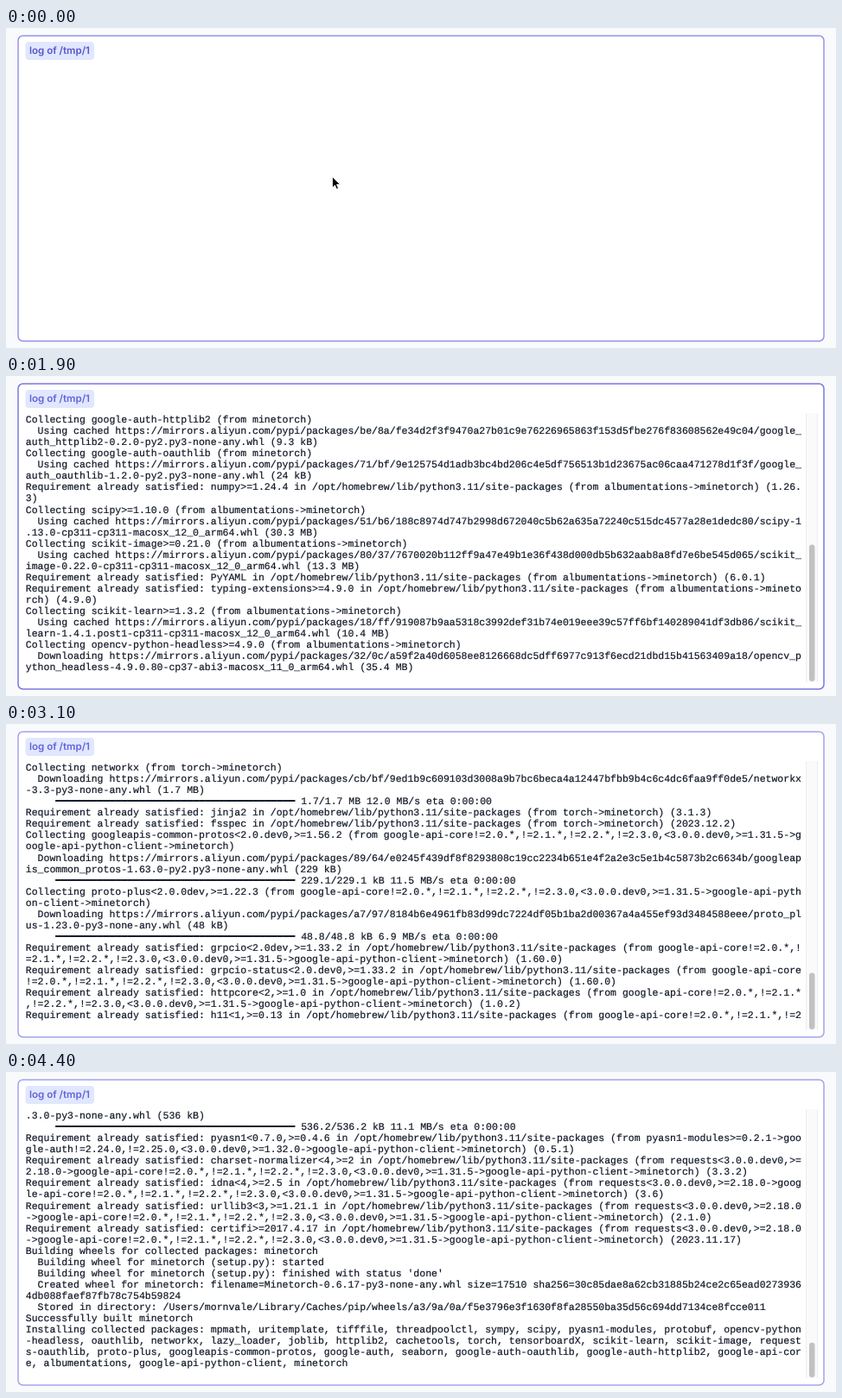
Animation, 960 px wide and 371 px high, one loop 4500 ms. Source, as an HTML page:

```html
<!DOCTYPE html>
<html lang="en">
<head>
<meta charset="utf-8">
<title>Install log</title>
<style>
  html, body { margin: 0; width: 100%; height: 100%; overflow: hidden; background: #f9fafc; }
  svg, pre { position: absolute; left: 0; top: 0; }
  pre {
    left: 22.8px; top: 45px; margin: 0; color: #111827; -webkit-text-stroke: .2px;
    font: 11.5px/13.06px "Liberation Mono", "DejaVu Sans Mono", monospace;
    text-rendering: geometricPrecision; font-variant-ligatures: none;
  }
  #badge { font: 600 11.55px Inter, sans-serif; text-rendering: geometricPrecision; }
</style>
</head>
<body>
<svg width="960" height="371">
  <rect id="card" x="14" y="9" width="932" height="354" rx="5.5" fill="#fff" stroke-width="1.5"/>
  <rect x="22.5" y="16" width="79.5" height="21" rx="4" fill="#e0e7ff"/>
  <text id="badge" x="27" y="30.3">log of /tmp/1</text>
  <g id="bar">
    <rect x="925.5" y="43" width="13" height="312" fill="#fafafa"/>
    <path d="M925.5 43v312M938.5 43v312" stroke="#ededed"/>
    <rect id="thumb" x="929" width="6.5" rx="3.2" fill="#c1c1c1"/>
  </g>
  <path id="cursor" d="M377.5 172.5v12.6l2.9-2.8 1.9 4.4 2.1-.9-1.9-4.3h4z" stroke="#fff" stroke-width=".8"/>
</svg>
<pre id="log"></pre>
<script>
const $ = id => document.getElementById(id);
const COLS = 130, ROWS = 23, LINE = 13.06, VIEW = 312, LOOP = 4500;
const CLIENT = 'google-api-python-client';
const CORE = 'google-api-core!=2.0.*,!=2.1.*,!=2.2.*,!=2.3.0,<3.0.0.dev0,>=1.31.5->' + CLIENT;
const AUTH = 'google-auth!=2.24.0,!=2.25.0,<3.0.0.dev0,>=1.32.0->' + CLIENT;
const REQUESTS = 'requests<3.0.0.dev0,>=2.18.0->' + CORE;
const ALB = 'albumentations', MPL = 'matplotlib', WHEEL = '-py3-none-any.whl';

const rows = [];   // wrapped terminal rows
const ends = [];   // row count after each burst of output

function say(...lines) {
  for (const line of lines)
    for (let i = 0; i < line.length; i += COLS) rows.push(line.slice(i, i + COLS));
}
const burst = () => ends.push(rows.length);
const from = by => `(from ${by ? by + '->' : ''}minetorch)`;

let seed = 7;
const hex = n => Array.from({ length: n }, () => {
  seed = seed * 16807 % 2147483647;
  return ((seed >> 8) % 16).toString(16);
}).join('');
const randomPath = () => [hex(2), hex(2), hex(60)].join('/');

function has(pkg, by, version) {
  say(`Requirement already satisfied: ${pkg} in /opt/homebrew/lib/python3.11/site-packages ${from(by)} (${version})`);
}
function get(pkg, by, file, size, path = randomPath(), verb = 'Downloading') {
  say(`Collecting ${pkg} ${from(by)}`,
      `  ${verb} https://mirrors.aliyun.com/pypi/packages/${path}/${file} (${size})`);
}
const cached = (pkg, by, file, size, path) => get(pkg, by, file, size, path, 'Using cached');
function progress(size, rate, unit = 'kB') {
  say(`     ${'━'.repeat(40)} ${size}/${size} ${unit} ${rate} MB/s eta 0:00:00`);
}

say('Looking in indexes: https://mirrors.aliyun.com/pypi/simple', 'Collecting minetorch',
    `  Using cached https://mirrors.aliyun.com/pypi/packages/${randomPath()}/minetorch-0.6.17.tar.gz (16 kB)`,
    '  Preparing metadata (setup.py): started',
    "  Preparing metadata (setup.py): finished with status 'done'");
cached(ALB, '', 'albumentations-1.4.3' + WHEEL, '137 kB');
cached('torch', '', 'torch-2.2.2-cp311-none-macosx_11_0_arm64.whl', '59.7 MB');
has(MPL, '', '3.8.4');
cached('tensorboardX', '', 'tensorboardX-2.6.2.2-py2.py3-none-any.whl', '101 kB');
cached('seaborn', '', 'seaborn-0.13.2' + WHEEL, '294 kB');
cached(CLIENT, '', 'google_api_python_client-2.125.0-py2.py3-none-any.whl', '12.4 MB');
has('tqdm', '', '4.66.2');
cached('google-auth-httplib2', '', 'google_auth_httplib2-0.2.0-py2.py3-none-any.whl', '9.3 kB',
  'be/8a/fe34d2f3f9470a27b01c9e76226965863f153d5fbe276f83608562e49c04');
cached('google-auth-oauthlib', '', 'google_auth_oauthlib-1.2.0-py2.py3-none-any.whl', '24 kB',
  '71/bf/9e125754d1adb3bc4bd206c4e5df756513b1d23675ac06caa471278d1f3f');
has('numpy>=1.24.4', ALB, '1.26.3');
cached('scipy>=1.10.0', ALB, 'scipy-1.13.0-cp311-cp311-macosx_12_0_arm64.whl', '30.3 MB',
  '51/b6/188c8974d747b2998d672040c5b62a635a72240c515dc4577a28e1dedc80');
cached('scikit-image>=0.21.0', ALB, 'scikit_image-0.22.0-cp311-cp311-macosx_12_0_arm64.whl', '13.3 MB',
  '80/37/7670020b112ff9a47e49b1e36f438d000db5b632aab8a8fd7e6be545d065');
has('PyYAML', ALB, '6.0.1');
has('typing-extensions>=4.9.0', ALB, '4.9.0');
cached('scikit-learn>=1.3.2', ALB, 'scikit_learn-1.4.1.post1-cp311-cp311-macosx_12_0_arm64.whl', '10.4 MB',
  '18/ff/919087b9aa5318c3992def31b74e019eee39c57ff6bf140289041df3db86');
get('opencv-python-headless>=4.9.0', ALB, 'opencv_python_headless-4.9.0.80-cp37-abi3-macosx_11_0_arm64.whl', '35.4 MB',
  '32/0c/a59f2a40d6058ee8126668dc5dff6977c913f6ecd21dbd15b41563409a18');
burst();

progress('35.4', '11.2', 'MB');
get('httplib2<1.dev0,>=0.15.0', CLIENT, 'httplib2-0.22.0' + WHEEL, '96 kB');
progress('96.9', '8.7');
get('google-auth!=2.24.0,!=2.25.0,<3.0.0.dev0,>=1.32.0', CLIENT, 'google_auth-2.29.0-py2.py3-none-any.whl', '189 kB');
progress('189.2', '12.1');
get(CORE.split('->')[0], CLIENT, 'google_api_core-2.18.0' + WHEEL, '138 kB');
progress('138.3', '10.4');
get('uritemplate<5,>=3.0.1', CLIENT, 'uritemplate-4.1.1-py2.py3-none-any.whl', '10 kB');
has('setuptools', 'tensorboardX', '69.0.3');
has('pyparsing<4,>=2.4.2', 'httplib2<1.dev0,>=0.15.0->' + CLIENT, '3.1.2');
has('wheel', 'torch', '0.42.0');
get('requests-oauthlib>=0.7.0', 'google-auth-oauthlib', 'requests_oauthlib-2.0.0-py2.py3-none-any.whl', '24 kB',
  '3b/5d/63d4ae3b9daea098d5d6f5da83984853c1bbacd5dc826764b249fe119d24');
has('contourpy>=1.0.1', MPL, '1.2.1');
has('cycler>=0.10', MPL, '0.12.1');
has('fonttools>=4.22.0', MPL, '4.51.0');
has('kiwisolver>=1.3.1', MPL, '1.4.5');
has('packaging>=20.0', MPL, '23.2');
has('pillow>=8', MPL, '10.0.0');
has('pyparsing>=2.3.1', MPL, '3.1.2');
has('python-dateutil>=2.7', MPL, '2.9.0.post0');
has('pandas>=1.2', 'seaborn', '2.2.1');
get('protobuf>=3.20', 'tensorboardX', 'protobuf-5.26.1-cp37-abi3-macosx_10_9_universal2.whl', '404 kB',
  '1e/40/2eb2bf643d4b060b1602a25748b48d75431f4951be2470f8ae136952b3d3');
progress('404.0', '12.4');
has('filelock', 'torch', '3.13.1');
get('sympy', 'torch', 'sympy-1.12' + WHEEL, '5.7 MB',
  'd2/05/e6600db80270777c4a64238a98d442f0fd07cc8915be2a1c16da7f2b9e74');
burst();

progress('5.7', '11.8', 'MB');
get('networkx', 'torch', 'networkx-3.3' + WHEEL, '1.7 MB');
progress('1.7', '12.0', 'MB');
has('jinja2', 'torch', '3.1.3');
has('fsspec', 'torch', '2023.12.2');
get('googleapis-common-protos<2.0.dev0,>=1.56.2', CORE, 'googleapis_common_protos-1.63.0-py2.py3-none-any.whl', '229 kB');
progress('229.1', '11.5');
get('proto-plus<2.0.0dev,>=1.22.3', CORE, 'proto_plus-1.23.0' + WHEEL, '48 kB');
progress('48.8', '6.9');
has('grpcio<2.0dev,>=1.33.2', CORE, '1.60.0');
has('grpcio-status<2.0.dev0,>=1.33.2', CORE, '1.60.0');
has('httpcore<2,>=1.0', CORE, '1.0.2');
has('h11<1,>=0.13', CORE, '0.14.0');
has('requests<3.0.0.dev0,>=2.18.0', CORE, '2.31.0');
get('cachetools<6.0,>=2.0.0', AUTH, 'cachetools-5.3.3' + WHEEL, '9.3 kB',
  'fb/2b/a64c2d25a37aeb921fddb929111413049fc5f8b9a4c1aefaffaafe768d54');
get('pyasn1-modules>=0.2.1', AUTH, 'pyasn1_modules-0.4.0' + WHEEL, '181 kB',
  '13/68/8906226b15ef38e71dc926c321d2fe99de8048e9098b5dfd38343011c886');
progress('181.2', '13.5');
has('rsa<5,>=3.1.4', AUTH, '4.9');
has('pytz>=2020.1', 'pandas>=1.2->seaborn', '2023.3.post1');
has('tzdata>=2022.7', 'pandas>=1.2->seaborn', '2024.1');
has('six>=1.5', 'python-dateutil>=2.7->matplotlib', '1.16.0');
get('oauthlib>=3.0.0', 'requests-oauthlib>=0.7.0->google-auth-oauthlib', 'oauthlib-3.2.2' + WHEEL, '151 kB',
  '7e/80/cab10959dc1faead58dc8384a781dfbf93cb4d33d50988f7a69f1b7c9bbe');
progress('151.7', '9.1');
has('imageio>=2.27', 'scikit-image>=0.21.0->' + ALB, '2.33.1');
burst();

const SKIMAGE = 'scikit-image>=0.21.0->' + ALB, SKLEARN = 'scikit-learn>=1.3.2->' + ALB;
get('tifffile>=2022.8.16', SKIMAGE, 'tifffile-2024.2.12' + WHEEL, '224 kB');
progress('224.5', '10.9');
has('pywavelets>=1.1.1', SKIMAGE, '1.5.0');
has('packaging>=21', SKIMAGE, '23.2');
has('pillow>=9.0.1', SKIMAGE, '10.0.0');
get('lazy_loader>=0.3', SKIMAGE, 'lazy_loader-0.4' + WHEEL, '12 kB');
get('joblib>=1.2.0', SKLEARN, 'joblib-1.4.0' + WHEEL, '301 kB');
progress('301.2', '6.2');
get('threadpoolctl>=2.0.0', SKLEARN, 'threadpoolctl-3.4.0' + WHEEL, '17 kB',
  '1e/84/ccd9b08653022b7785b6e3ee070ffb2825841e0dc119be22f0840b2b35cb');
has('MarkupSafe>=2.0', 'jinja2->torch', '2.1.4');
get('mpmath>=0.19', 'sympy->torch', 'mpmath-1.3.0' + WHEEL, '536 kB',
  '43/e3/7d92a15f894aa0c9c4b49b8ee9ac9850d6e63b03c9c32c0367a13ae62209');
progress('536.2', '11.1');
has('pyasn1<0.7.0,>=0.4.6', 'pyasn1-modules>=0.2.1->' + AUTH, '0.5.1');
has('charset-normalizer<4,>=2', REQUESTS, '3.3.2');
has('idna<4,>=2.5', REQUESTS, '3.6');
has('urllib3<3,>=1.21.1', REQUESTS, '2.1.0');
has('certifi>=2017.4.17', REQUESTS, '2023.11.17');
say('Building wheels for collected packages: minetorch',
    '  Building wheel for minetorch (setup.py): started');
burst();

say("  Building wheel for minetorch (setup.py): finished with status 'done'",
    '  Created wheel for minetorch: filename=Minetorch-0.6.17-py3-none-any.whl size=17510 sha256=30c85dae8a62cb31885b24ce2c65ead02739364db088faef87fb78c754b59824',
    '  Stored in directory: /Users/mornvale/Library/Caches/pip/wheels/a3/9a/0a/f5e3796e3f1630f8fa28550ba35d56c694dd7134ce8fcce011',
    'Successfully built minetorch',
    'Installing collected packages: mpmath, uritemplate, tifffile, threadpoolctl, sympy, scipy, pyasn1-modules, protobuf, ' +
    'opencv-python-headless, oauthlib, networkx, lazy_loader, joblib, httplib2, cachetools, torch, tensorboardX, scikit-learn, ' +
    'scikit-image, requests-oauthlib, proto-plus, googleapis-common-protos, google-auth, seaborn, google-auth-oauthlib, ' +
    'google-auth-httplib2, google-api-core, albumentations, google-api-python-client, minetorch');
burst();

// start and end time of each burst
const spans = [[0, 900], [2300, 2800], [2800, 3400], [3400, 3900], [4100, 4200]];

function rowsAt(t) {
  let count = 0;
  spans.forEach(([a, b], i) => {
    const k = Math.min(1, Math.max(0, (t - a) / (b - a)));
    count += k * (ends[i] - (ends[i - 1] || 0));
  });
  return Math.round(count);
}

const LIGHT = [167, 166, 240], DARK = [95, 93, 216];

function draw(now) {
  const t = Math.floor(now % LOOP / 100) * 100;
  const n = rowsAt(t);
  $('log').textContent = rows.slice(Math.max(0, n - ROWS), n).join('\n');

  const height = VIEW * VIEW / ((n + 1) * LINE);
  $('bar').style.display = n > ROWS ? '' : 'none';
  $('thumb').setAttribute('height', height);
  $('thumb').setAttribute('y', 354 - height);

  // the border pulses once a second
  const glow = ((1 + Math.cos((t - 750) / 500 * Math.PI)) / 2) ** 2;
  $('card').setAttribute('stroke', `rgb(${LIGHT.map((c, i) => c + (DARK[i] - c) * glow)})`);
  $('badge').setAttribute('fill', t ? '#6462d8' : '#5755cb');
  $('cursor').style.display = t ? 'none' : '';
}

const start = performance.now();
function tick() {
  draw(performance.now() - start);
  requestAnimationFrame(tick);
}
tick();
</script>
</body>
</html>
```
